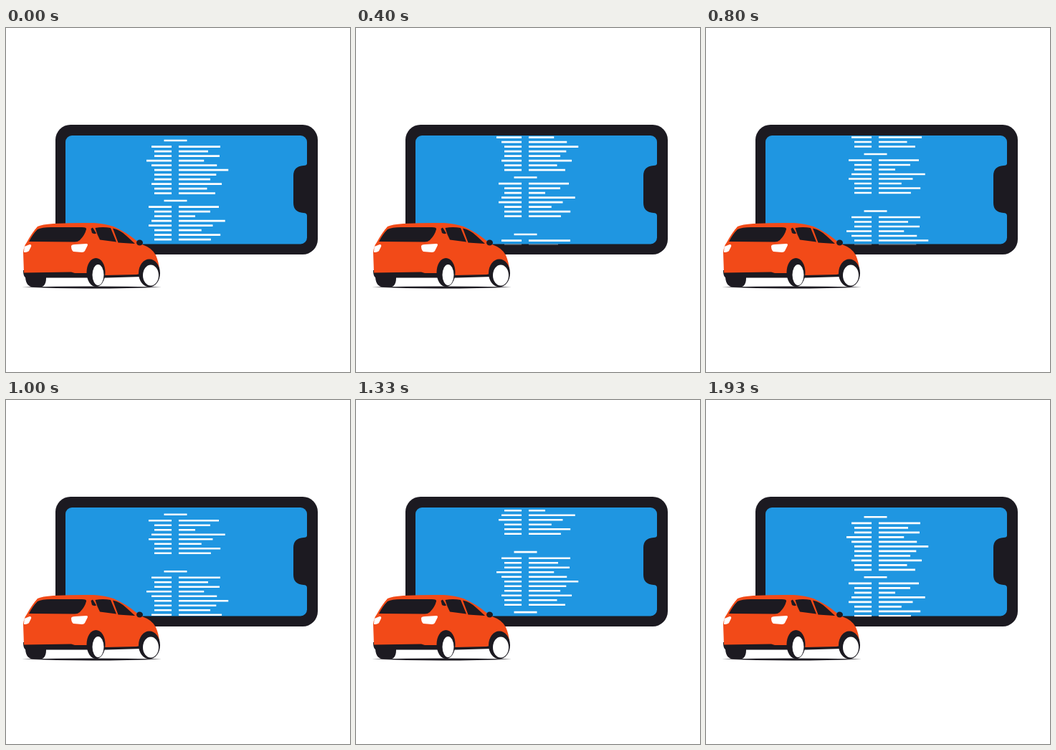
Recreate the animation shown at these times as an HTML page. Size 480 by 480 pixels, loop 1990 ms.

```html
<!DOCTYPE html>
<html lang="en">
<head>
<meta charset="utf-8">
<title>Car and scrolling phone</title>
<style>
  html, body { margin: 0; width: 100%; height: 100%; overflow: hidden; background: #fff; }
  svg { display: block; width: 100vw; height: 100vh; }
  .ink { fill: #1c1a21; }
  .paint { fill: #f24a18; }
  .light { fill: #fff; }
</style>
</head>
<body>
<svg viewBox="0 0 480 480">
  <defs>
    <clipPath id="view"><rect x="83" y="151" width="337" height="151.2"/></clipPath>
  </defs>

  <g id="phone">
    <rect class="ink" x="69" y="135" width="366" height="181" rx="21"/>
    <rect x="83" y="150" width="337" height="151.500" rx="9" fill="#1f96e1"/>
    <path class="ink" d="M422 189H420Q420 192 415 192Q401 193 401 206V244Q401 257 415 258Q420 258 420 262H422Z"/>
  </g>
  <g clip-path="url(#view)"><path id="lines" stroke="#fff" stroke-width="2.600"/></g>

  <g id="car">
    <path class="ink" d="M22 361.500Q70 360.500 120 360.500T217 361.500Q170 363.500 120 363.500T22 361.500Z"/>
    <path class="ink" d="M24 338H190V347L140 348.500H56Q56 361.500 47 361.500H38Q28 361 27 348Q24 346 24 338Z"/>
    <path class="paint" d="M25 341.500L24 313Q25 304 29 299Q36 286 44 277Q50 274 66 273Q95 271.500 123 272Q138 273 150 277Q168 285 181 296L191 302.500Q204 307 209 317Q213 326 214 337L182 344L138 345L113 342L96 342L91 340.500Z"/>
    <path class="ink" d="M32 298Q37 288 44 281Q50 278 63 278H106Q113 278 112 281Q110 289 103 296Q100 298.500 96 298.500Z"/>
    <path class="ink" d="M118.500 280L121 278.500L126 286.500Q123 288 120 286Z"/>
    <path class="ink" d="M124.500 279Q135 277 146 279L154 298.500L131 295.500Q127 288 124.500 279Z"/>
    <path class="ink" d="M149 279.500Q160 282 168 290L180 301L156.500 299.500Z"/>
    <ellipse class="ink" cx="186.500" cy="299.500" rx="4.500" ry="4"/>
    <path class="light" d="M91 304Q92 302 96 302L112 301Q115 301 113.500 304L110 311Q109 313 106 313L94 312Q91 310 91 304Z"/>
    <path class="light" d="M25.500 305L33 302Q36 302 35 305L32 311Q30 313 25 313Z"/>
    <ellipse class="ink" cx="125.500" cy="341" rx="13" ry="20"/>
    <ellipse class="light" cx="128.500" cy="344.500" rx="8" ry="14.500"/>
    <ellipse class="ink" cx="200" cy="342" rx="15" ry="19.500"/>
    <ellipse class="light" cx="202" cy="345" rx="11" ry="14.500"/>
  </g>
</svg>

<script>
const LOOP = 1990;
const PERIOD = 163.5;
const STEP = 5.42;
const ROW = 6.5;
const FIRST_ROW = 8.6;

// Values cycle through three columns of widths whose swing fades with each cycle.
const blocks = [
  { top: 0, count: 11, label: 28, fourth: 35, mean: [45, 48, 64], swing: [13, -7, -7] },
  { top: 84, count: 8, label: 32, fourth: 28, mean: [61, 46, 28], swing: [-5, -2, -5] }
];

const lines = document.getElementById("lines");
const dash = (from, to, y) => `M${from} ${y}H${to}`;

function labelWidth(block, row) {
  if (row === 3) return block.fourth;
  return row % 4 ? 24 : block.label;
}

function valueWidth({ mean, swing }, row) {
  const column = row % 3;
  return mean[column] + swing[column] * (-0.75) ** Math.floor(row / 3);
}

function blockPath(block, shift) {
  const top = block.top + shift;
  let d = dash(220.5, 252.5, top);
  for (let row = 0; row < block.count; row++) {
    const y = top + FIRST_ROW + row * ROW;
    d += dash(231 - labelWidth(block, row), 231, y);
    d += dash(241, 241 + valueWidth(block, row), y);
  }
  return d;
}

lines.setAttribute("d", [0, PERIOD, 2 * PERIOD]
  .flatMap(shift => blocks.map(block => blockPath(block, shift))).join(""));

// The text moves 15 times a second, on a 10 ms clock.
function draw(time) {
  const tick = Math.floor((time % LOOP) / 10);
  const step = Math.floor((tick + 0.4) * 3 / 20);
  lines.setAttribute("transform", `translate(0 ${157 - step * STEP})`);
}

function loop(now) {
  draw(now);
  requestAnimationFrame(loop);
}
draw(0);
requestAnimationFrame(loop);
</script>
</body>
</html>
```
